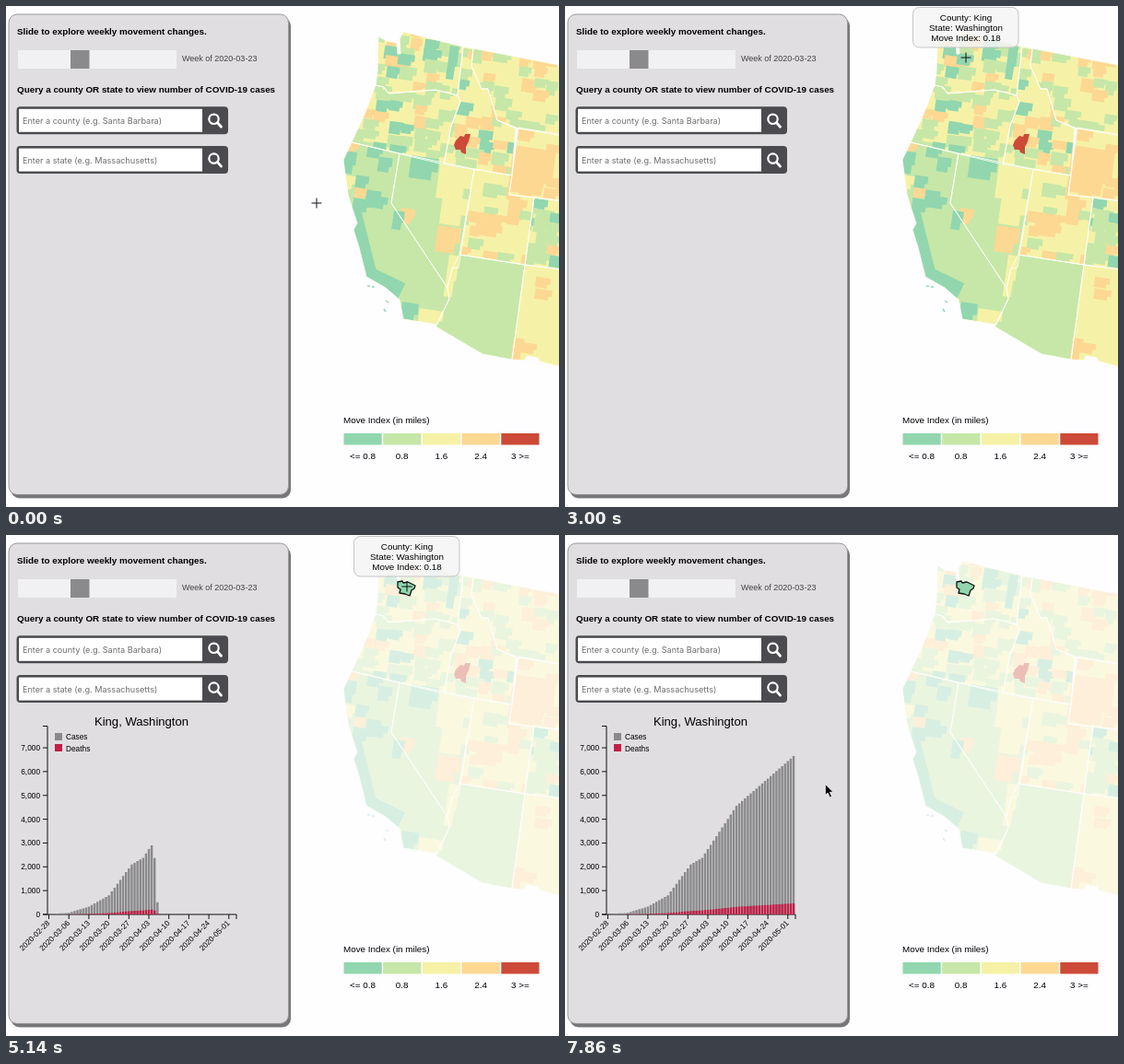
Animation of 600 by 544 pixels, one loop 8000 ms. Source, as an HTML page:

```html
<!DOCTYPE html>
<html lang="en">
<head>
<meta charset="utf-8">
<title>Weekly movement map</title>
<style>
html, body { margin: 0; width: 100%; height: 100%; overflow: hidden; background: #fefdff; }
svg { display: block; width: 600px; height: 544px; font: 9.85px "Liberation Sans", Arial, sans-serif; }
.hint { font: 9.1px Inter, sans-serif; fill: #6c6c6c; }
.bold { font-weight: bold; }
.small { font-size: 8.3px; }
.mid { text-anchor: middle; }
.end { text-anchor: end; }
.line { fill: none; stroke: #111; }
</style>
</head>
<body>
<svg viewBox="0 0 600 544">
  <defs id="defs"></defs>
  <rect x="5.5" y="12.5" width="303.5" height="522" rx="9" fill="#777"/>
  <rect x="3" y="9" width="303.5" height="521.5" rx="9" fill="#e0dee0" stroke="#999"/>
  <text class="bold" x="12" y="31">Slide to explore weekly movement changes.</text>
  <rect x="13" y="48" width="172" height="20" fill="#f1f0f2"/>
  <rect x="70" y="48" width="20.5" height="20" fill="#8a898b"/>
  <text x="191" y="60" font-size="9" fill="#444">Week of 2020-03-23</text>
  <text class="bold" x="12" y="93.5">Query a county OR state to view number of COVID-19 cases</text>
  <g id="fields"></g>
  <g id="map"></g>
  <path id="king" fill="#91d6ae" stroke="#111" stroke-width="1.3" stroke-linejoin="round"
    d="M425 51 430 50 431 52 436 51 444 55 443 58 440 60 438 66 433 64 427 63 428 59 425 57Z"/>
  <g id="legend"><text x="366" y="453">Move Index (in miles)</text></g>
  <g id="chart">
    <text class="mid" x="147" y="206.5" font-size="13.1">King, Washington</text>
    <path class="line" d="M40 207.5H45V412H40M45 412H250V417"/>
    <rect x="53" y="215" width="8" height="8" fill="#8a898b"/>
    <rect x="53" y="227" width="8" height="8" fill="#c21f47"/>
    <text class="small" x="65" y="222">Cases</text>
    <text class="small" x="65" y="234.5">Deaths</text>
    <path id="cases" fill="#8a898b"/>
    <path id="deaths" fill="#c21f47"/>
  </g>
  <g id="tip" class="mid">
    <rect width="114.5" height="43.5" rx="7" fill="#f5f5f6" fill-opacity=".85" stroke="#c4c4c6"/>
    <text x="57.5" y="14"></text><text x="57.5" y="25.3"></text><text x="57.5" y="36.7"></text>
  </g>
  <path id="cross" class="line" d="M-5.5 0H5.5M0 -5.5V5.5"/>
  <path id="arrow" stroke="#fff" stroke-width=".8" d="M0 0V12L2.8 9.5 5 14.4 7.2 13.4 5 8.7H8.7Z"/>
</svg>
<script>
const $ = id => document.getElementById(id);
function add(parent, tag, attrs, text = '') {
  const el = document.createElementNS('http://www.w3.org/2000/svg', tag);
  for (const k in attrs) el.setAttribute(k, attrs[k]);
  el.textContent = text;
  return parent.appendChild(el);
}
const colors = { t: '#91d6ae', g: '#c6e7a8', y: '#f5f2a7', o: '#fdd893', r: '#cc4a37' };

// Search fields
['Enter a county (e.g. Santa Barbara)', 'Enter a state (e.g. Massachusetts)'].forEach((hint, i) => {
  const g = add($('fields'), 'g', { transform: `translate(0 ${109.3 + 42.8 * i})` });
  add(g, 'rect', { x: 11.5, width: 229.5, height: 30, rx: 4, fill: '#4b4a4e' });
  add(g, 'rect', { x: 14, y: 2.5, width: 199, height: 25, fill: '#fff' });
  add(g, 'text', { x: 18, y: 18.5, class: 'hint' }, hint);
  add(g, 'circle', { cx: 225.5, cy: 13.5, r: 5.2, fill: 'none', stroke: '#fff', 'stroke-width': 2.2 });
  add(g, 'path', { d: 'M229.5 17.5L233.5 22', stroke: '#fff', 'stroke-width': 2.8, 'stroke-linecap': 'round' });
});

// States: colour mix (base first), lowest row of mixed counties, outline
const states = [
  ['yyygggot', 110, '404 33 413 38 424 40 425 52 428 52 427 36 431 28 496 44 490 97 466 91 428 94 415 95 410 88 401 86 403 70'],
  ['yyygggot', 180, '401 86 410 88 415 95 428 94 466 91 490 97 493 104 483 130 475 172 375 148 390 115'],
  ['ggggyot', 215, '375 148 427 160 418 214 479 306 481 318 468 346 431 340 427 319 412 306 391 294 383 262 377 243 381 236 371 205 366 167'],
  ['g', 0, '427 160 508 177 491 284 484 285 479 306 418 214'],
  ['yyyggot', 190, '496 44 507 46 505 65 516 90 523 90 533 124 553 133 549 184 475 172 483 130 493 104 490 97'],
  ['yyyyggo', 145, '507 46 610 66 610 142 556 133 533 124 523 90 516 90 505 65'],
  ['yyyyo', 215, '556 132 610 141 610 212 546 205'],
  ['yyyygo', 285, '508 177 549 184 546 205 573 208 563 281 492 270'],
  ['yyggot', 290, '573 208 610 213 610 287 563 281'],
  ['g', 0, '492 270 563 281 549 384 517 378 466 348 481 318 479 306 484 285'],
  ['yyyyyyo', 395, '563 281 610 287 610 394 579 386 577 382 565 380 563 385 549 384']
];
// Distinct counties: x,y,width,height
const marked = {
  y: '471,172,36,36 474,206,28,30 481,270,11,45 449,328,26,18',
  o: '551,151,46,50 469,238,25,28 429,219,15,16 502,222,46,12 510,235,29,13 551,360,12,24',
  t: '426,51,18,12 440,162,30,24 393,205,22,13 367,157,14,24 430,321,18,20 482,43,10,36 421,222,12,20'
};

let seed = 11;
const rnd = () => (seed = seed * 16807 % 2147483647) / 2147483647;
// Tilted block with a stepped eastern edge
const county = (x, y, w, h) =>
  `M${x} ${y}l${w} ${w * .15} ${-h * .08} ${h * .6} ${-w * .2} ${-w * .03} ${-h * .06} ${h * .4} ${-w * .8} ${-w * .12}Z`;

const map = $('map'), land = add($('defs'), 'clipPath', { id: 'land' });
states.forEach(([mix, south, pts], i) => {
  const d = `M${pts}Z`, nums = pts.split(' ').map(Number);
  const xs = nums.filter((_, k) => k % 2 === 0), ys = nums.filter((_, k) => k % 2);
  const west = Math.min(...xs), east = Math.max(...xs), north = Math.min(...ys);
  add(land, 'path', { d });
  add(add($('defs'), 'clipPath', { id: 'state' + i }), 'path', { d });
  add(map, 'path', { d, fill: colors[mix[0]] });
  const g = add(map, 'g', { 'clip-path': `url(#state${i})` });
  for (let row = north - 15; row < south; row += 12)
    for (let x = west - 4; x < east; x += 14) {
      const y = row + (x - west) * .15, c = mix[Math.floor(rnd() * mix.length)];
      const block = county(x + rnd() * 4, y + rnd() * 4, 12 + rnd() * 8, 9 + rnd() * 7);
      if (c !== mix[0] && y < south - 6) add(g, 'path', { d: block, fill: colors[c] });
    }
});
const onLand = add(map, 'g', { 'clip-path': 'url(#land)' });
for (const c in marked)
  for (const box of marked[c].split(' '))
    add(onLand, 'path', { d: county(...box.split(',').map(Number)), fill: colors[c] });
add(onLand, 'path', { d: 'M372 218L383 262 391 294 428 312', fill: 'none', stroke: colors.t, 'stroke-width': 24 });
add(map, 'path', { d: 'M486 151 488 146 493 141 497 142 498 139 504 139 502 147 499 153 499 161 494 159 493 156 488 156Z', fill: colors.r });
for (const [, , pts] of states)
  add(map, 'path', { d: `M${pts}Z`, fill: 'none', stroke: '#fffef8', 'stroke-width': .9, 'stroke-linejoin': 'round' });
add(map, 'path', { d: 'M392 304h3M397 305h3M412 320l3 2M410 329l2 3', stroke: colors.t, 'stroke-width': 1.5 });

// Legend
Object.values(colors).forEach((fill, i) => {
  add($('legend'), 'rect', { x: 366.5 + 42.7 * i, y: 464, width: 41.2, height: 12.5, fill });
  add($('legend'), 'text', { x: 387 + 42.7 * i, y: 491.5, class: 'mid' }, ['<= 0.8', '0.8', '1.6', '2.4', '3 >='][i]);
});

// Axes
const unit = 25.85 / 1000, base = 412, step = 3.1;
for (let k = 0; k < 8; k++) {
  const y = base - k * 1000 * unit;
  add($('chart'), 'path', { d: `M40 ${y}h5`, class: 'line' });
  add($('chart'), 'text', { x: 37, y: y + 3, class: 'small end' }, k ? k + ',000' : '0');
}
for (let k = 0; k < 10; k++) {
  const x = 46.5 + 7 * step * k;
  const day = new Date(Date.UTC(2020, 1, 28 + 7 * k)).toISOString().slice(0, 10);
  add($('chart'), 'path', { d: `M${x} 412v5`, class: 'line' });
  add($('chart'), 'text', { transform: `translate(${x + 1.5} 422) rotate(-45)`, class: 'small end' }, day);
}

// Linear interpolation through rows of [position, ...values]
function along(rows, p) {
  let i = 1;
  while (i < rows.length - 1 && rows[i][0] < p) i++;
  const a = rows[i - 1], b = rows[i];
  const f = Math.min(1, Math.max(0, (p - a[0]) / (b[0] - a[0])));
  return a.slice(1).map((v, k) => v + (b[k + 1] - v) * f);
}
const growth = [[0, 10], [7, 70], [14, 330], [21, 800], [29, 2100], [33, 2380], [45, 4560], [65, 6650]];
const ease = p => p < .5 ? 4 * p ** 3 : 1 - 4 * (1 - p) ** 3;
function bars(share, t) {
  let d = '';
  for (let i = 0; i < 66; i++) {
    const p = Math.min(1, Math.max(0, (t - 3180 - 50 * i) / 185));
    const h = along(growth, i)[0] * share * unit * ease(p);
    if (h) d += `M${45.3 + step * i} ${base}v${-h}h2.45v${h}z`;
  }
  return d;
}

// Time, pointer x, y, tooltip offset x, y
const moves = [
  [140, 337, 214, -57, -56], [1140, 401, 92, -57, -56], [1710, 431, 71, -65, -55.5], [2290, 435, 56, -57.5, -54.5],
  [6430, 435, 56, -57.5, -54.5], [7000, 418, 88, -48.5, -61], [7430, 336, 208, -52, -58], [7860, 282, 271, -52, -58]
];
const labels = [
  [0], [1000, 'Clatsop', 'Oregon', '1.28'], [1430, 'Lewis', 'Washington', '2.13'], [2000, 'King', 'Washington', '0.18'],
  [6710, 'Skamania', 'Washington', '1.03'], [7140, 'Clatsop', 'Oregon', '1.28'], [7280]
];
const tip = $('tip'), tipLines = tip.querySelectorAll('text');
const show = (el, on) => el.style.display = on ? '' : 'none';
const place = (el, x, y) => el.setAttribute('transform', `translate(${x} ${y})`);

function draw(time) {
  // The screen refreshes seven times a second
  const t = Math.floor((time % 8000 + 5) * .007) / .007;
  const picked = t > 3100;
  map.style.opacity = picked ? .35 : 1;
  show($('king'), picked);
  show($('chart'), picked);
  $('cases').setAttribute('d', bars(1, t));
  $('deaths').setAttribute('d', bars(.07, t));

  const [x, y, dx, dy] = along(moves, t);
  show($('cross'), x > 309);
  show($('arrow'), x <= 309);
  place($('cross'), x, y);
  place($('arrow'), x, y);

  const [, name, state, index] = labels.filter(l => l[0] <= t + 5).pop();
  show(tip, name);
  place(tip, x + dx, y + dy);
  [`County: ${name}`, `State: ${state}`, `Move Index: ${index}`].forEach((s, i) => tipLines[i].textContent = s);
}
const start = performance.now();
function loop() {
  draw(performance.now() - start);
  requestAnimationFrame(loop);
}
loop();
</script>
</body>
</html>
```
